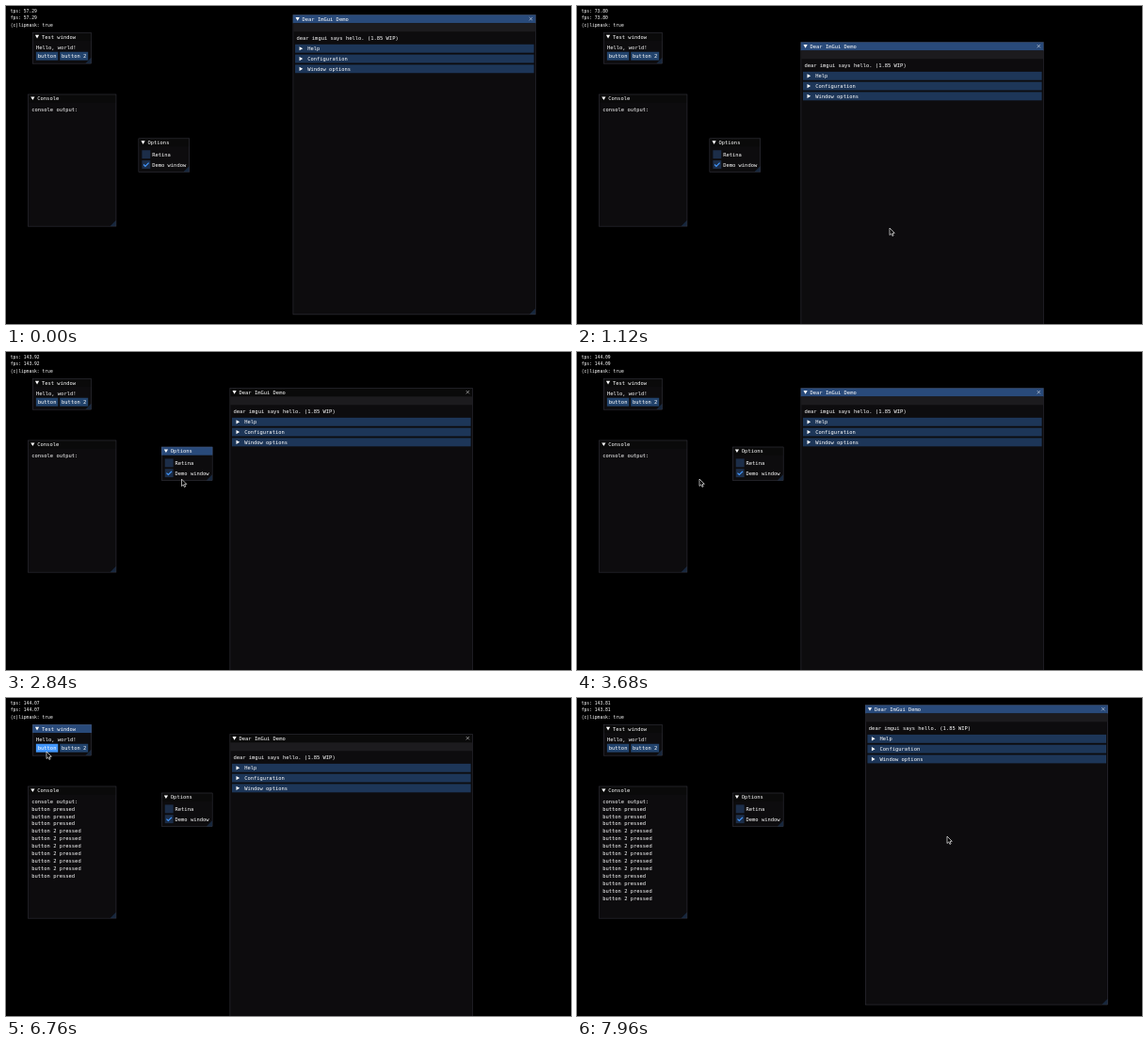
Recreate the animation shown at these times as an HTML page with a canvas. Size 600x338 px, loop 8000 ms.

```html
<!DOCTYPE html>
<html lang="en">
<head>
<meta charset="utf-8">
<title>Dear ImGui Demo</title>
<style>
html, body { margin: 0; width: 100%; height: 100%; overflow: hidden; background: #000; }
canvas { display: block; width: 600px; height: 338px; }
</style>
</head>
<body>
<canvas width="600" height="338"></canvas>
<script>
const ctx = document.querySelector('canvas').getContext('2d');
const LOOP = 8000, STEP = 40;
const SCALE = 600 / 1280; // all drawing uses 1280-wide app units
const BAR = 19, PAD = 8, LINE = 17, CHAR = 7;

const COLOR = {
  text: '#fff', bg: '#0d0c0e', title: '#0a0a0a', titleActive: '#294a7a', menu: '#1c1b1e',
  border: 'rgba(110,110,128,.5)', header: 'rgba(66,150,250,.31)', grip: 'rgba(66,150,250,.2)',
  button: 'rgba(66,150,250,.4)', hover: '#4296fa', active: '#0f87fa',
  frame: 'rgba(41,74,122,.54)', check: '#4296fa'
};

// Pointer stops in stage pixels
const PLACE = {
  corner: [552, 14], demoGrab: [399, 207], demoDrop: [332, 236],
  optionsGrab: [163.7, 144.8], optionsNear: [182, 119], optionsDrop: [188, 105],
  below: [209, 147], checkbox: [173, 128], between: [130, 135], left: [9, 60],
  button: [43, 57], button2: [64, 54], bodyGrab: [324.6, 177.9], bodyDrop: [393, 147]
};
// The pointer rests between moves: from, until, place
const MOVES = [
  [40, 200, 'corner'], [200, 360, 'demoGrab'], [560, 1000, 'demoDrop'],
  [1140, 1480, 'optionsGrab'], [1520, 2000, 'optionsNear'], [2000, 2160, 'optionsDrop'],
  [2240, 2560, 'below'], [2560, 3040, 'checkbox'], [3400, 3680, 'between'],
  [3680, 4000, 'left'], [4000, 4320, 'button'], [5280, 5440, 'button2'],
  [6400, 6600, 'button'], [6920, 7080, 'button2'],
  [7260, 7680, 'bodyGrab'], [7680, 7960, 'bodyDrop']
];

// Evenly spaced runs of presses
const run = (name, first, gap, count) =>
  Array.from({ length: count }, (_, i) => ({ name, at: first + i * gap }));
const PRESSES = [
  ...run('button', 4440, 340, 3), ...run('button 2', 5560, 140, 6),
  ...run('button', 6760, 160, 2), ...run('button 2', 7120, 120, 2)
];
const RATES = ['57.29', '73.80', '144.36', '143.92', '144.09', '143.98', '143.87', '144.07', '143.81'];
const FOCUS = [[0, 'demo'], [1500, 'options'], [3400, 'demo'], [4360, 'test'], [7680, 'demo']];

let now = 0, mouse, resting, focus;

function pointer(t) {
  let [x, y] = [78, 338];
  for (const [from, until, place] of MOVES) {
    if (t < from) break;
    const u = Math.min(1, (t - from) / (until - from)), e = u * u * (3 - 2 * u);
    x += (PLACE[place][0] - x) * e;
    y += (PLACE[place][1] - y) * e;
  }
  return [x / SCALE, y / SCALE];
}

// Pointer travel between two times
function drag(from, until) {
  const a = pointer(from), b = pointer(Math.max(from, Math.min(now, until)));
  return [b[0] - a[0], b[1] - a[1]];
}

function box(x, y, w, h, color) {
  ctx.fillStyle = color;
  ctx.fillRect(x, y, w, h);
}

function text(str, x, y, size = 11.63, rise = 11) {
  ctx.font = size + 'px "DejaVu Sans Mono", monospace';
  ctx.fillStyle = COLOR.text;
  ctx.fillText(str, x, y + rise);
}

function trace(points) {
  ctx.beginPath();
  points.forEach(p => ctx.lineTo(...p));
}

function poly(points, color) {
  trace(points);
  ctx.fillStyle = color;
  ctx.fill();
}

function stroke(points, color, width) {
  trace(points);
  ctx.strokeStyle = color;
  ctx.lineWidth = width;
  ctx.stroke();
}

function arrow(x, y, down) {
  const pts = [[3.9, 0], [-3.9, 4.5], [-3.9, -4.5]];
  poly(pts.map(([a, b]) => down ? [x + b, y + a] : [x + a, y + b]), COLOR.text);
}

function hovered(x, y, w, h) {
  const [mx, my] = mouse;
  return resting && mx >= x && mx < x + w && my >= y && my < y + h;
}

function panel(id, title, x, y, w, h) {
  const right = x + w - 1, bottom = y + h - 1, grip = 13;
  box(x, y, w, h, COLOR.bg);
  box(x, y, w, BAR, focus === id ? COLOR.titleActive : COLOR.title);
  poly([[right, bottom - grip], [right, bottom], [right - grip, bottom]], COLOR.grip);
  ctx.strokeStyle = COLOR.border;
  ctx.lineWidth = 1;
  ctx.strokeRect(x + .5, y + .5, w - 1, h - 1);
  arrow(x + 10.5, y + BAR / 2, true);
  text(title, x + 21, y + 3);
}

function button(name, x, y) {
  const w = name.length * CHAR + PAD;
  const held = PRESSES.some(p => p.name === name && now >= p.at - 80 && now < p.at);
  box(x, y, w, BAR, held ? COLOR.active : hovered(x, y, w, BAR) ? COLOR.hover : COLOR.button);
  text(name, x + 4, y + 3);
}

function checkbox(label, x, y, on) {
  box(x, y, BAR, BAR, hovered(x, y, BAR, BAR) ? COLOR.button : COLOR.frame);
  if (on) stroke([[x + 3.7, y + 9.5], [x + 7.6, y + 13.4], [x + 15.4, y + 5.6]], COLOR.check, 2.6);
  text(label, x + 23, y + 3);
}

function testWindow() {
  panel('test', 'Test window', 60, 60, 134, 71);
  text('Hello, world!', 68, 87);
  button('button', 68, 104);
  button('button 2', 122, 104);
}

function consoleWindow() {
  panel('console', 'Console', 50, 200, 200, 300);
  const lines = PRESSES.filter(p => p.at <= now).map(p => p.name + ' pressed');
  ['console output:', ...lines].forEach((s, i) => text(s, 58, 227 + i * LINE));
}

function optionsWindow(demoOn) {
  const [dx, dy] = drag(1520, 2160), x = Math.round(300 + dx), y = Math.round(300 + dy);
  panel('options', 'Options', x, y, 116, 77);
  checkbox('Retina', x + PAD, y + 27, false);
  checkbox('Demo window', x + PAD, y + 50, demoOn);
}

function demoWindow() {
  const a = drag(560, 1000), b = drag(7680, 7960);
  const x = Math.round(650 + a[0] + b[0]), y = Math.round(20 + a[1] + b[1]), w = 550;
  panel('demo', 'Dear ImGui Demo', x, y, w, 680);
  const cx = x + w - 11, cy = y + 9;
  for (const d of [-3.6, 3.6]) stroke([[cx - d, cy - 3.6], [cx + d, cy + 3.6]], COLOR.text, 1);
  box(x + 1, y + BAR, w - 2, BAR, COLOR.menu);
  text('dear imgui says hello. (1.85 WIP)', x + PAD, y + 46);
  ['Help', 'Configuration', 'Window options'].forEach((s, i) => {
    const top = y + 67 + i * 23;
    box(x + 5, top, w - 9, BAR, COLOR.header);
    arrow(x + 18.5, top + BAR / 2);
    text(s, x + 33, top + 3);
  });
}

function cursor() {
  const [x, y] = mouse;
  const shape = [[0, 0], [0, 16], [3.7, 12.6], [6.2, 18], [8.8, 16.8], [6.4, 11.5], [11.3, 11.3], [0, 0]]
    .map(([a, b]) => [x + a, y + b]);
  poly(shape, '#000');
  stroke(shape, '#fff', 1.4);
}

function draw(ms) {
  now = Math.floor(ms % LOOP / STEP) * STEP;
  mouse = pointer(now);
  resting = String(mouse) === String(pointer(now - STEP));
  focus = FOCUS.filter(f => f[0] <= now).pop()[1];
  ctx.setTransform(SCALE, 0, 0, SCALE, 0, 0);
  box(0, 0, 1280, 722, '#000');

  const rate = RATES[Math.floor((now + 360) / 1000)];
  ['tps: ' + rate, 'fps: ' + rate, '(c)lipmask: true']
    .forEach((s, i) => text(s, 10, i * 16, 9.97, 14));

  const demoOn = now < 3160 || now >= 3400;
  testWindow();
  consoleWindow();
  optionsWindow(demoOn);
  if (demoOn) demoWindow();
  if (now > 0) cursor();
}

const start = performance.now();
function tick() {
  draw(performance.now() - start);
  requestAnimationFrame(tick);
}
tick();
</script>
</body>
</html>
```
